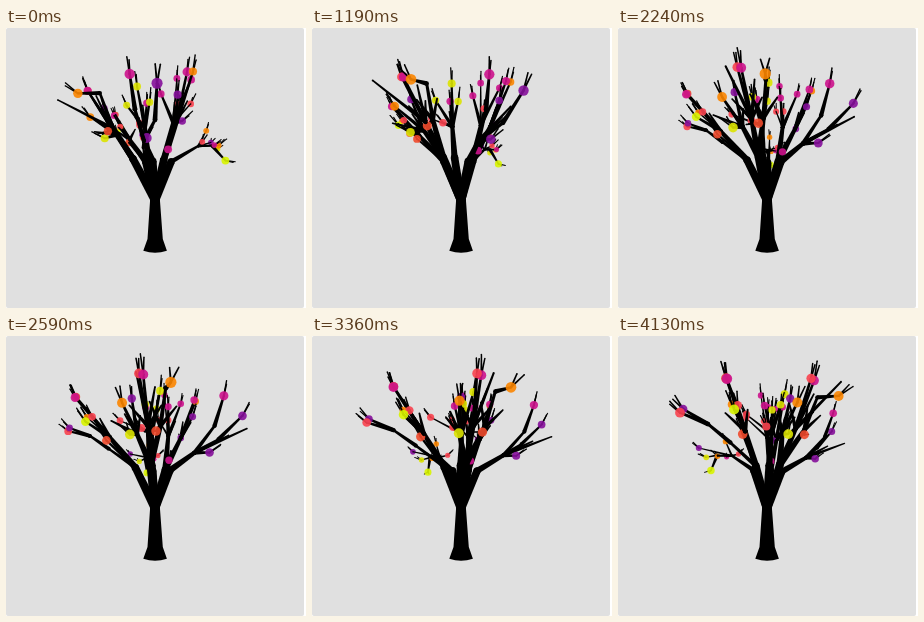
Recreate the animation shown at these times as an HTML page with a canvas. Size 300 by 280 pixels, loop 4.2 s.

```html
<!DOCTYPE html>
<html lang="en">
<head>
<meta charset="utf-8">
<title>Turning tree</title>
<style>
  html, body { margin: 0; width: 100%; height: 100%; overflow: hidden; background: #fff; }
  canvas { display: block; }
</style>
</head>
<body>
<canvas id="stage" width="300" height="280"></canvas>
<script>
const ctx = document.getElementById('stage').getContext('2d');
const LOOP = 4200, STEP = 70, DEGREES_PER_STEP = 2;
const CENTRE = 149, HORIZON = 165, EYE = 300;
const RAD = Math.PI / 180;
const PURPLE = '#85109a', MAGENTA = '#cc128c', RED = '#f8434f', CORAL = '#f04a2c';
const ORANGE = '#fb8500', YELLOW = '#dbe300', LIME = '#d8f400';

const segments = [], fruits = [];
let seed = 7;
const random = () => (seed = seed * 16807 % 2147483647) / 2147483647;

// Points are given as bearing, distance from the trunk axis and height.
const at = (bearing, radius, y) => ({ x: radius * Math.sin(bearing * RAD), y, z: radius * Math.cos(bearing * RAD) });
const add = (a, b, k = 1) => ({ x: a.x + b.x * k, y: a.y + b.y * k, z: a.z + b.z * k });
const unit = v => {
  const n = Math.hypot(v.x, v.y, v.z) || 1;
  return { x: v.x / n, y: v.y / n, z: v.z / n };
};

function wood(a, b, wa, wb) {
  segments.push({ a, b, wa, wb });
  return b;
}
const crotch = at(0, 0, -7);
const limb = (...p) => wood(crotch, at(...p), 8.8, 7.4);
const arm = (from, ...p) => wood(from, at(...p), 3.8, 2.4);
const shoot = (from, ...p) => wood(from, at(...p), 3.6, 1.4);

function bough(from, bearing, radius, y) {
  const end = wood(from, at(bearing, radius, y), 6.4, 4);
  for (const side of [-1, 1]) {
    shoot(end, bearing + side * (8 + random() * 8), radius * 1.25, y + 12 + random() * 10);
  }
  return end;
}
function twigs(from, to, length) {
  const out = unit(add(unit(add(to, from, -1)), { x: 0, y: .45, z: 0 }));
  for (const side of [-1, 1]) {
    const spread = { x: out.z * side * .3, y: random() * .3, z: -out.x * side * .3 };
    wood(to, add(to, add(out, spread), length * (.75 + random() * .4)), 1.6, 1.1);
  }
}
function fruit(from, colour, bearing, radius, y, size = 4) {
  const p = at(bearing, radius, y);
  const width = size > 3.4 ? 3.8 : 2.4;
  wood(from, p, width, width / 2);
  twigs(from, p, size * 2.8);
  fruits.push({ p, colour, size });
}

// Front
const front = limb(-8, 16, 30);
const elbow = wood(front, at(-13, 42, 45), 6.2, 3.8);
const rise = arm(elbow, -15, 62, 67);
fruit(rise, MAGENTA, -16, 71, 92);
const reach = arm(elbow, 0, 62, 58);
fruit(reach, PURPLE, 1, 84, 79);
shoot(elbow, -10, 89, 63);
shoot(elbow, -5, 72, 60);
fruit(elbow, PURPLE, -7, 55, 45);

// Front right
const right = limb(45, 12, 32);
const rightHigh = bough(right, 42, 30, 66);
fruit(rightHigh, MAGENTA, 39, 45, 107);
fruit(rightHigh, ORANGE, 43, 49, 107, 3.6);
fruit(rightHigh, PURPLE, 30, 40, 87, 3.6);
fruit(rightHigh, PURPLE, 50, 33, 67, 3.5);
const rightInner = bough(right, 62, 20, 68);
fruit(rightInner, MAGENTA, 60, 39, 106, 3.6);
fruit(rightInner, MAGENTA, 79, 22, 113, 3.4);
fruit(rightInner, MAGENTA, 25, 13.5, 95, 3.5);
fruit(rightInner, RED, 70, 24, 86, 3.4);
fruit(rightInner, RED, 100, 37, 91, 3.4);
fruit(right, MAGENTA, 48, 17, 42, 3.8);

// Left
const left = limb(-85, 22, 34);
const leftFront = bough(left, -68, 44, 64);
const leftBend = arm(leftFront, -65, 56, 92);
fruit(leftBend, ORANGE, -65, 76, 89, 4.2);
fruit(leftFront, CORAL, -73, 47, 59);
const leftMid = bough(left, -82, 43, 64);
fruit(leftMid, RED, -85, 66, 100, 3.8);
fruit(leftMid, MAGENTA, -82, 66, 99, 3.9);
shoot(leftMid, -82, 94, 89);
shoot(leftMid, -74, 58, 92);
const leftBack = bough(left, -98, 39, 59);
fruit(leftBack, PURPLE, -96, 52, 86, 3.5);
fruit(leftBack, ORANGE, -97, 67, 78);
fruit(leftBack, YELLOW, -98, 52, 56, 4.1);
shoot(leftBack, -106, 67, 65);

// Back left
const back = limb(-150, 20, 33);
const backHigh = bough(back, -142, 46, 60);
fruit(backHigh, MAGENTA, -141, 78, 93);
fruit(backHigh, CORAL, -142, 77, 94, 3.8);
fruit(backHigh, LIME, -140, 69, 72);
fruit(backHigh, RED, -140, 63, 77, 3.5);
fruit(backHigh, ORANGE, -143, 67, 77, 3);
fruit(back, CORAL, -143, 49, 57, 4.1);
const backLow = arm(arm(back, -163, 46, 52), -168, 66, 66);
fruit(backLow, RED, -170, 90, 72);
fruit(backLow, PURPLE, -169, 88, 75, 3.5);

// Back right, drooping
const low = limb(113, 18, 32);
const lowArm = wood(low, at(113, 50, 50), 4.6, 2.6);
const lowTip = wood(lowArm, at(116, 70, 52), 2.4, 1.6);
fruit(lowArm, ORANGE, 113, 60, 67, 3.2);
fruit(lowArm, PURPLE, 128, 83, 59, 3.4);
fruit(lowArm, ORANGE, 112, 75, 52, 3.2);
fruit(lowArm, RED, 102, 50, 53, 3);
fruit(lowArm, MAGENTA, 107, 66, 51, 3);
fruit(lowTip, YELLOW, 120, 82, 50, 3.3);
fruit(lowTip, LIME, 113, 85, 36, 4.4);

// Crown
const crown = bough(limb(-100, 7, 35), -92, 10, 65);
fruit(crown, YELLOW, -60, 20, 103, 3.8);
fruit(crown, YELLOW, -92, 28.5, 88, 3.5);
fruit(crown, YELLOW, -62, 6, 90, 3.6);
fruit(crown, MAGENTA, -130, 11, 92, 3.7);
fruit(crown, RED, -120, 18, 70, 3.8);
fruit(crown, RED, -150, 35, 78, 3.3);

function project(p, turn) {
  const c = Math.cos(turn), s = Math.sin(turn);
  const z = p.z * c - p.x * s, scale = EYE / (EYE - z);
  return { x: CENTRE + (p.x * c + p.z * s) * scale, y: HORIZON - p.y * scale, z, scale };
}
function disc(x, y, r, colour) {
  ctx.fillStyle = colour;
  ctx.beginPath();
  ctx.arc(x, y, r, 0, 7);
  ctx.fill();
}
function drawWood({ a, b, wa, wb }) {
  const ra = wa * a.scale / 2, rb = wb * b.scale / 2;
  const n = Math.hypot(b.x - a.x, b.y - a.y) || 1;
  const nx = (a.y - b.y) / n, ny = (b.x - a.x) / n;
  disc(a.x, a.y, ra, '#000');
  disc(b.x, b.y, rb, '#000');
  ctx.beginPath();
  ctx.moveTo(a.x + nx * ra, a.y + ny * ra);
  ctx.lineTo(b.x + nx * rb, b.y + ny * rb);
  ctx.lineTo(b.x - nx * rb, b.y - ny * rb);
  ctx.lineTo(a.x - nx * ra, a.y - ny * ra);
  ctx.fill();
}
function drawFruit(p, { size, colour }) {
  ctx.globalAlpha = .9;
  disc(p.x, p.y, size * p.scale, colour);
  ctx.globalAlpha = 1;
}
function drawTrunk() {
  ctx.fillStyle = '#000';
  ctx.beginPath();
  ctx.moveTo(144.3, 169);
  ctx.lineTo(141.5, 211);
  ctx.lineTo(137.3, 222.8);
  ctx.quadraticCurveTo(149, 226.6, 160.9, 222.8);
  ctx.lineTo(156.8, 211);
  ctx.lineTo(153.7, 169);
  ctx.fill();
}
function drawBackdrop() {
  ctx.clearRect(0, 0, 300, 280);
  ctx.fillStyle = '#e0e0e0';
  ctx.beginPath();
  ctx.roundRect(0, 0, 298, 280, 2);
  ctx.fill();
}
function draw(time) {
  const turn = Math.floor(time % LOOP / STEP) * DEGREES_PER_STEP * RAD;
  drawBackdrop();
  drawTrunk();
  const items = segments.map(s => {
    const a = project(s.a, turn), b = project(s.b, turn);
    return { z: (a.z + b.z) / 2, paint: () => drawWood({ a, b, wa: s.wa, wb: s.wb }) };
  });
  for (const f of fruits) {
    const p = project(f.p, turn);
    items.push({ z: p.z + f.size * 2, paint: () => drawFruit(p, f) });
  }
  items.sort((m, n) => m.z - n.z).forEach(item => item.paint());
}

const start = performance.now();
function tick() {
  draw(performance.now() - start);
  requestAnimationFrame(tick);
}
tick();
</script>
</body>
</html>
```
